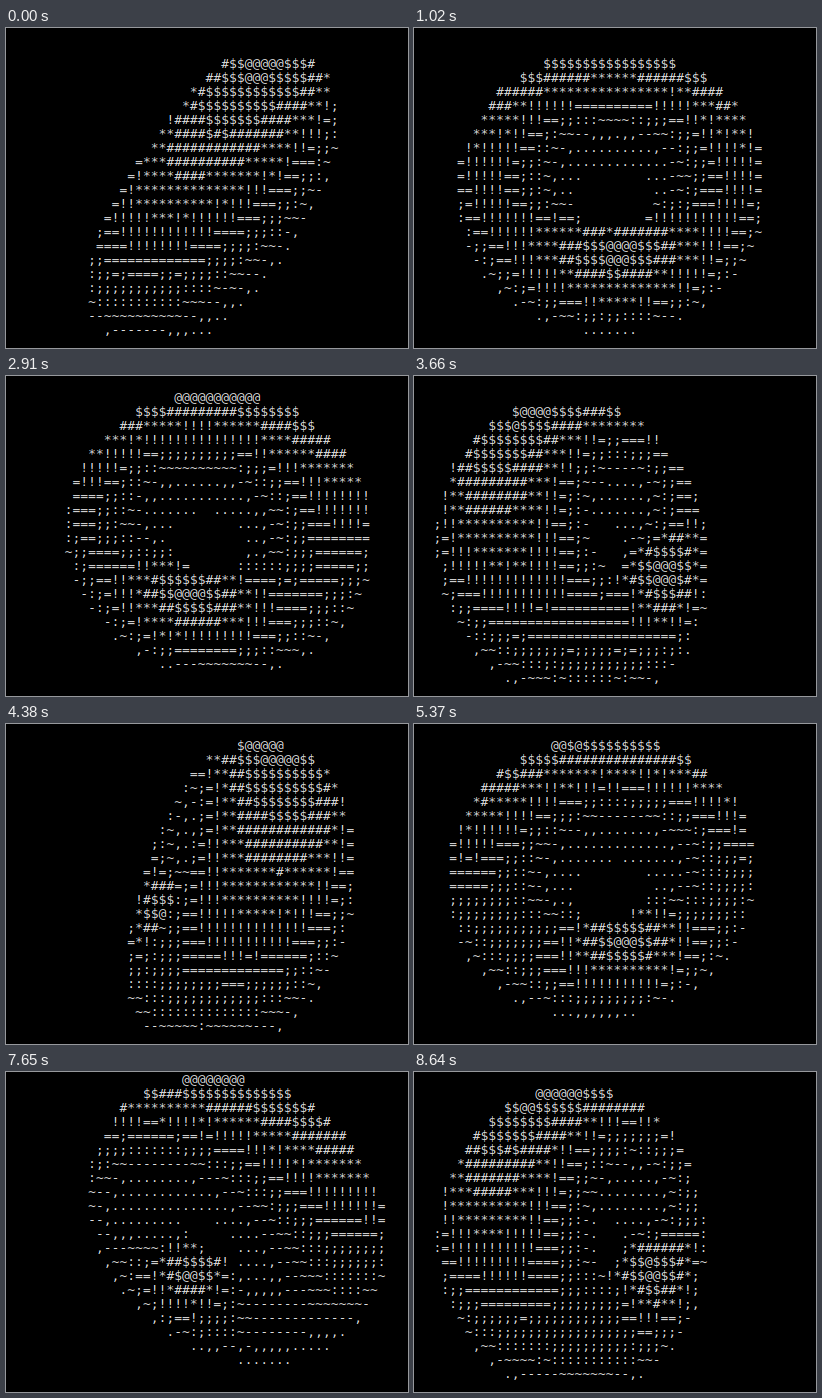
These frames come from a looping animation (402x320 px, 8.67 s). An HTML page with a canvas:

```html
<!DOCTYPE html>
<html lang="en">
<head>
<meta charset="utf-8">
<title>Spinning ASCII torus</title>
<style>
  html, body { margin: 0; width: 100%; height: 100%; overflow: hidden; background: #000; }
  canvas { display: block; }
</style>
</head>
<body>
<canvas id="stage" width="402" height="320"></canvas>
<script>
const LOOP = 8670, TICK = 30;
const W = 402, H = 320;
const COLS = 80, ROWS = 22, CROP = 15, SHOWN = 51;
const SIZE = 13, ADVANCE = SIZE * 1233 / 2048;
const LEFT = 3.85, BASELINE = 12, LINE = 14;
const INK = 221;
const SHADES = ".,-~:;=!*#$@";
const FIRST_STEP = 456;

// Ticks at which the short and long holds swap places.
const SWAPS = [46, 92, 132, 190, 222, 259];
const STALL = 9;

const ctx = document.getElementById("stage").getContext("2d");
const image = ctx.createImageData(W, H);

// Text is drawn three times as wide here: one column per colour stripe of a pixel.
const stripes = document.createElement("canvas");
stripes.width = 3 * W;
stripes.height = H;
const pen = stripes.getContext("2d", { willReadFrequently: true });
pen.font = SIZE + 'px "DejaVu Sans Mono", monospace';
pen.fillStyle = "#fff";
pen.scale(3, 1);

// Two steps every three ticks, with one pause near the start.
function stepAt(ms) {
  const tick = Math.floor(ms / TICK), phase = tick % 3;
  const early = SWAPS.filter(s => s <= tick).length % 2 === 0;
  const odd = phase === 2 || (phase === 1 && early);
  return 2 * Math.floor(tick / 3) + (odd ? 1 : 0) - (tick >= STALL ? 1 : 0);
}

function angles(stride) {
  const list = [];
  for (let a = 0; a < 6.28; a += stride) list.push([Math.sin(a), Math.cos(a)]);
  return list;
}
const tube = angles(0.07), ring = angles(0.02);

function torus(A, B) {
  const sA = Math.sin(A), cA = Math.cos(A), sB = Math.sin(B), cB = Math.cos(B);
  const cells = new Array(COLS * ROWS).fill(" ");
  const depth = new Float64Array(COLS * ROWS);
  for (const [st, ct] of tube) {
    const h = ct + 2;
    for (const [sp, cp] of ring) {
      const D = 1 / (sp * h * sA + st * cA + 5);
      const t = sp * h * cA - st * sA;
      const x = Math.trunc(40 + 30 * D * (cp * h * cB - t * sB));
      const y = Math.trunc(12 + 15 * D * (cp * h * sB + t * cB));
      const o = x + COLS * y;
      if (y < 0 || y >= ROWS || D <= depth[o]) continue;
      const light = (st * sA - sp * ct * cA) * cB - sp * ct * sA - st * cA - cp * ct * sB;
      depth[o] = D;
      cells[o] = SHADES[Math.max(0, Math.trunc(8 * light))];
    }
  }
  return cells;
}

// Smooths the stripes and packs each three into one pixel's red, green and blue.
function packStripes() {
  const src = pen.getImageData(0, 0, 3 * W, H).data, out = image.data;
  const cover = i => src[4 * i + 3] || 0;
  for (let p = 0; p < W * H; p++) {
    for (let c = 0; c < 3; c++) {
      const i = 3 * p + c;
      const sum = 8 * (cover(i - 2) + cover(i + 2))
        + 77 * (cover(i - 1) + cover(i + 1)) + 86 * cover(i);
      out[4 * p + c] = sum / 256 * INK / 255;
    }
    out[4 * p + 3] = 255;
  }
  ctx.putImageData(image, 0, 0);
}

function draw(step) {
  const n = FIRST_STEP + step;
  const cells = torus(1 + 0.07 * n, 1 + 0.03 * n);
  pen.clearRect(0, 0, W, H);
  for (let r = 0; r < ROWS; r++) {
    for (let c = 0; c < SHOWN; c++) {
      const glyph = cells[r * COLS + CROP + c];
      if (glyph !== " ") pen.fillText(glyph, LEFT + ADVANCE * c, BASELINE + LINE * r);
    }
  }
  packStripes();
}

const start = performance.now();
let shown = -1;
function frame() {
  const step = stepAt((performance.now() - start) % LOOP);
  if (step !== shown) draw(shown = step);
  requestAnimationFrame(frame);
}
frame();
</script>
</body>
</html>
```
